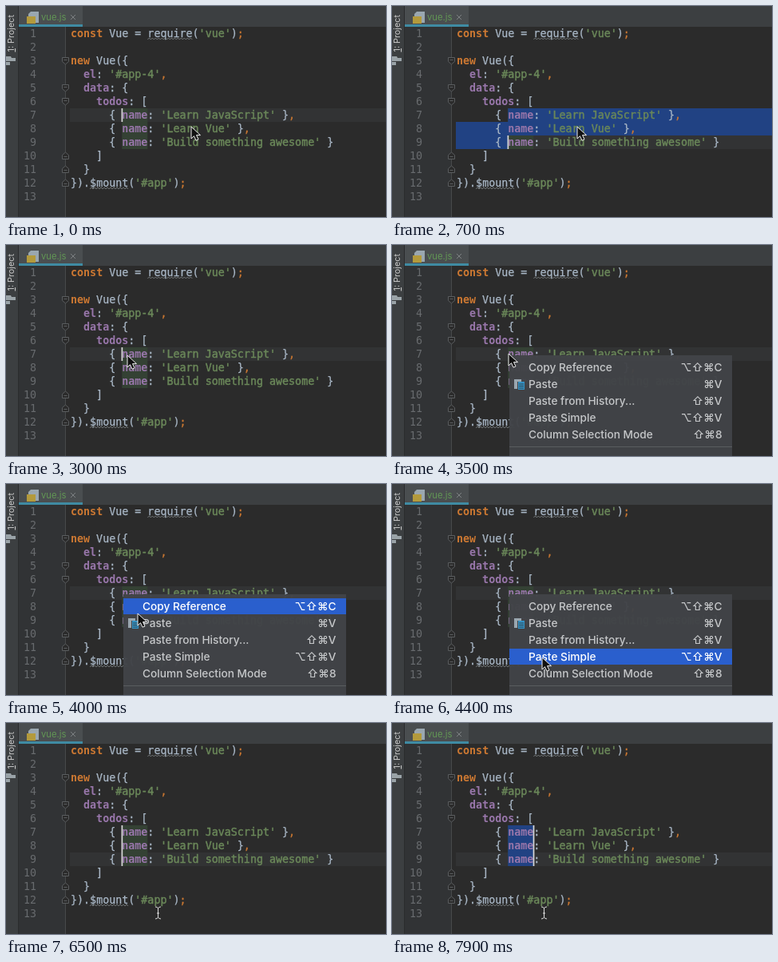
An HTML page for the animation above (8000 ms loop, 476 by 264 pixels).

```html
<!DOCTYPE html>
<html>
<head>
<meta charset="utf-8">
<style>
html, body { margin: 0; height: 100%; overflow: hidden; background: #2b2b2b; }
svg { display: block; }
text { white-space: pre; }
.code { font: 13.35px "DejaVu Sans Mono", monospace; fill: #a9b7c6; }
.code text { stroke: #a9b7c6; stroke-width: .25; }
.code .k { fill: #cc7832; stroke: #cc7832; }
.code .b { fill: #cc7832; stroke: none; font-weight: bold; }
.code .s { fill: #6a8759; stroke: #6a8759; stroke-width: .45; }
.code .p { fill: #9876aa; stroke: none; font-weight: bold; }
.code .num { fill: #686b6e; stroke: none; text-anchor: end; }
.ui { font: 10.8px Inter, sans-serif; fill: #c8c8c8; }
.item { font: 500 13.7px Inter, "DejaVu Sans", sans-serif; fill: #c6c8ca; }
.keys { text-anchor: end; }
.on { fill: #fff; }
</style>
</head>
<body>
<svg id="stage" width="476" height="264" viewBox="0 0 476 264">
  <rect width="476" height="264" fill="#2b2b2b"/>
  <rect x="16" y="26" width="59" height="238" fill="#313335"/>
  <rect x="74" y="26" width="1" height="238" fill="#47494a"/>
  <g id="back"></g>
  <g id="text" class="code"></g>
  <g id="carets"></g>

  <rect width="476" height="26" fill="#3c3f41"/>
  <rect x="16" width="80" height="26" fill="#4a4e50"/>
  <rect x="16" y="23" width="80" height="3" fill="#3f8ba3"/>
  <path d="M31 7h10v14h-13v-11z" fill="#9aa7b0"/>
  <rect x="26" y="13" width="11" height="9" fill="#b39a3c"/>
  <text x="44" y="18" class="ui" style="font-size:11.3px;fill:#629755">vue.js</text>
  <path d="M81 11l6 6m0-6l-6 6" stroke="#7d8183"/>
  <rect width="15" height="264" fill="#3c3f41"/>
  <rect x="15" width="1" height="264" fill="#2a2c2d"/>
  <text class="ui" transform="translate(10 57.500) rotate(-90)"><tspan text-decoration="underline">1</tspan>: Project</text>
  <path d="M0 63h6l1 2h5v4h-12z" fill="#9aa3a8"/>
  <rect y="70" width="5" height="4" fill="#9aa3a8"/>

  <g id="menu">
    <rect x="147" y="138" width="279" height="130" fill="#424448" fill-opacity=".97"/>
    <rect id="hover" x="147" width="279" height="20" fill="#2a5fcd"/>
    <rect x="147" y="252" width="279" height="1" fill="#5a5d5f"/>
    <path d="M153 168h9v3h-5v9h-4z" fill="#9aa7b0"/>
    <path d="M158 171h8v10h-8z" fill="#3592c4"/>
    <path d="M159 174h6m-6 2.500h6m-6 2.500h6" stroke="#2d4552"/>
  </g>
  <path id="arrow" d="M0 0v15l3.500-3.300 2.500 5.500 3-1.300-2.500-5.300h5z" fill="#111" stroke="#eee"/>
  <path id="beam" d="M187 230q3 0 3.500 2q.5-2 3.500-2m-3.500 2v11m-3.500 2q3 0 3.500-2q.5 2 3.500 2m-5-7h3" fill="none" stroke="#ddd"/>
</svg>
<script>
const LEFT = 81, CH = 8.03, ROW = 17, TOP = 26;
const $ = id => document.getElementById(id);
const colX = c => LEFT + c * CH;
const rowY = n => TOP + (n - 1) * ROW;

function add(parent, tag, attrs, text) {
  const el = document.createElementNS("http://www.w3.org/2000/svg", tag);
  for (const a in attrs) el.setAttribute(a, attrs[a]);
  if (text) el.textContent = text;
  parent.appendChild(el);
  return el;
}

const lines = `const Vue = require('vue');

new Vue({
  el: '#app-4',
  data: {
    todos: [
      { name: 'Learn JavaScript' },
      { name: 'Learn Vue' },
      { name: 'Build something awesome' }
    ]
  }
}).$mount('#app');
`.split("\n");

const token = /(const|new)\b|('[^']*')|(\w+)(?=:)|([,;])|[^\s,;']+?(?=[\s,;']|$)/g;
lines.forEach((line, i) => {
  const y = rowY(i + 1) + 13;
  add($("text"), "text", { x: 38, y, class: "num" }, String(i + 1));
  for (const m of line.matchAll(token)) {
    const kind = m[1] ? "b" : m[2] ? "s" : m[3] ? "p" : m[4] ? "k" : "";
    add($("text"), "text", { x: colX(m.index), y, class: kind }, m[0]);
  }
});

// wavy underlines
for (const [n, col, len] of [[1, 12, 7], [12, 3, 6]])
  add($("text"), "path", {
    d: `M${colX(col)} ${rowY(n) + 16}` + "l2-2l2 2".repeat(len * 2),
    fill: "none", stroke: "#85898c", "stroke-width": .8
  });

// fold markers
for (const n of [3, 5, 6, 10, 11, 12])
  add($("text"), "path", {
    d: "M-4-4h8v5l-4 3.500l-4-3.500zM-2-1h4",
    transform: `translate(74.500 ${rowY(n) + 8.5}) scale(1 ${n < 9 ? 1 : -1})`,
    fill: "#2b2b2b", stroke: "#5a5d5f"
  });

const items = [["Copy Reference", "⌥⇧⌘C"], ["Paste", "⌘V"], ["Paste from History...", "⇧⌘V"],
  ["Paste Simple", "⌥⇧⌘V"], ["Column Selection Mode", "⇧⌘8"]];
const labels = items.map(([name, keys], i) => [
  add($("menu"), "text", { x: 171, y: 158 + i * 21 }, name),
  add($("menu"), "text", { x: 413.5, y: 158 + i * 21 }, keys)
]);

// value of the last [time, value] step that has begun
const stepAt = (steps, t) => steps.filter(s => s[0] <= t).pop()[1];
const caretRow = [[0, 7], [300, 8], [600, 9], [1300, 8], [1800, 7], [6100, 8], [6500, 9]];
const caretCol = [[0, 8], [7100, 9], [7300, 10], [7500, 11], [7700, 12]];
const mouse = [[0, 232, 151], [2300, 232, 151], [2700, 122, 141], [3000, 152, 138], [3100, 152, 138],
  [3300, 146, 136], [3500, 146, 136], [4000, 165, 162], [4400, 188, 217], [4700, 190, 236], [8000, 190, 236]];

function mouseAt(t) {
  const i = mouse.findIndex(m => m[0] > t);
  const [a, b] = [mouse[i - 1], mouse[i]];
  const f = (t - a[0]) / (b[0] - a[0]);
  return [a[1] + (b[1] - a[1]) * f, a[2] + (b[2] - a[2]) * f];
}

function drawEditor(t, open) {
  const back = $("back"), carets = $("carets");
  back.replaceChildren();
  carets.replaceChildren();
  const fill = (n, x, end, color) => end > x &&
    add(back, "rect", { x, y: rowY(n), width: end - x, height: ROW, fill: color });
  const row = stepAt(caretRow, t), col = stepAt(caretCol, t), x = colX(col);
  const blocks = t >= 5100, start = colX(8), blue = "#214283";

  fill(row, 80, 476, "#323334");
  for (const n of [7, 8, 9]) fill(n, start, colX(12), "#344134");
  for (let n = 7; n <= row; n++) {
    if (blocks) fill(n, start, x, blue);
    else fill(n, n == 7 ? start : 80, n == row ? start : 476, blue);
  }
  if (open) return;
  for (let n = blocks ? 7 : row; n <= row; n++)
    add(carets, "rect", { x: x - .7, y: rowY(n), width: 1.7, height: ROW, fill: "#d8d8d8" });
}

function draw(t) {
  const open = t >= 3300 && t < 5100;
  const [x, y] = mouseAt(t);
  drawEditor(t, open);

  const hot = open && y >= 143 ? Math.floor((y - 143) / 21) : -1;
  $("menu").style.display = open ? "" : "none";
  $("hover").style.display = hot < 0 ? "none" : "";
  $("hover").setAttribute("y", 143 + hot * 21);
  labels.forEach((pair, i) => pair.forEach((el, j) =>
    el.setAttribute("class", "item" + (j ? " keys" : "") + (i == hot ? " on" : ""))));

  $("arrow").style.display = t < 5100 ? "" : "none";
  $("arrow").setAttribute("transform", `translate(${x} ${y})`);
  $("beam").style.display = t < 5100 ? "none" : "";
}

// the screen refreshes ten times a second
function tick() {
  draw(Math.floor(performance.now() % 8000 / 100) * 100);
  requestAnimationFrame(tick);
}
tick();
</script>
</body>
</html>
```
